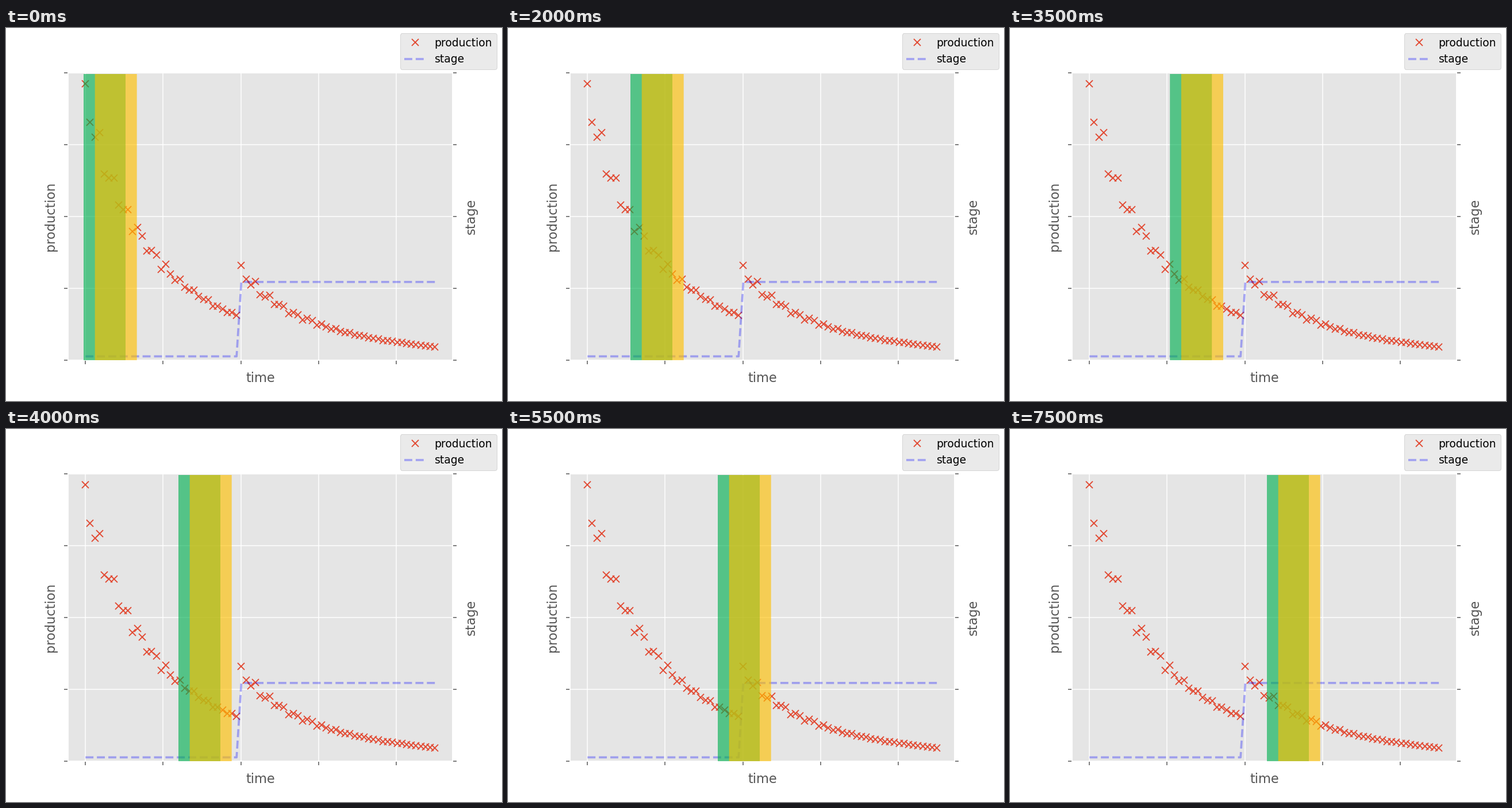
Recreate the animation shown at these times as a matplotlib script. Size 863x649 px, loop 8 s.

```python
import numpy as np
import matplotlib.pyplot as plt
from matplotlib.animation import FuncAnimation
from matplotlib.patches import Rectangle

W, H, DPI = 863, 649, 135
FRAMES, STEP_MS = 16, 500
POINTS, RESTART = 75, 33
BAND_W, BAND_GAP = 73, 19.7

plt.style.use("ggplot")
fig = plt.figure(figsize=((W + 1e-3) / DPI, (H + 1e-3) / DPI), dpi=DPI)
ax = fig.add_subplot()

# Two hyperbolic declines with a fading ripple and a little noise
rng = np.random.default_rng(4)
time = np.arange(POINTS)
second = time >= RESTART
age = time - RESTART * second
peak = np.where(second, 152, 455)
rate = np.where(second, 0.0186, 0.0218)
fade = 1 - age / 45
ripple = 0.07 * np.cos(2 * np.pi * (age - 3) / 2.84)
noise = rng.normal(0, 0.015, POINTS)
output = peak / (1 + rate * age) ** (10 / 3) * (1 + fade * (ripple + noise))
stage = np.where(second, 135.8, 6.3)


def style_axis(axes, label, pad):
    axes.set(ylim=(0, 500), yticks=np.linspace(0, 500, 5))
    axes.set_ylabel(label, labelpad=pad)
    axes.set_yticklabels([])


ax.plot(time, output, "x", label="production")
ax.set(xlabel="time", xticks=np.arange(5) * 16.45)
ax.set_xticklabels([])
style_axis(ax, "production", 3)

right = ax.twinx()
right.plot(time, stage, "--", color="blue", alpha=0.3, lw=2, label="stage")
right.grid(False)
style_axis(right, "stage", 4)
fig.legend(loc="upper right")


def add_band(color):
    band = Rectangle((0, H - 578), BAND_W, 498, fc=color, ec="none", lw=0,
                     alpha=0.63, transform=None, zorder=10, snap=False)
    return fig.add_artist(band)


green, amber = add_band("#00b050"), add_band("#ffc000")


def update(i):
    x = np.interp(i, [0, 4, 8, 11, 15], [135, 213, 300, 365, 447])
    green.set_x(x)
    amber.set_x(x + BAND_GAP)
    return green, amber


anim = FuncAnimation(fig, update, frames=FRAMES, interval=STEP_MS,
                     repeat=True, repeat_delay=0, blit=False)
plt.show()
```
